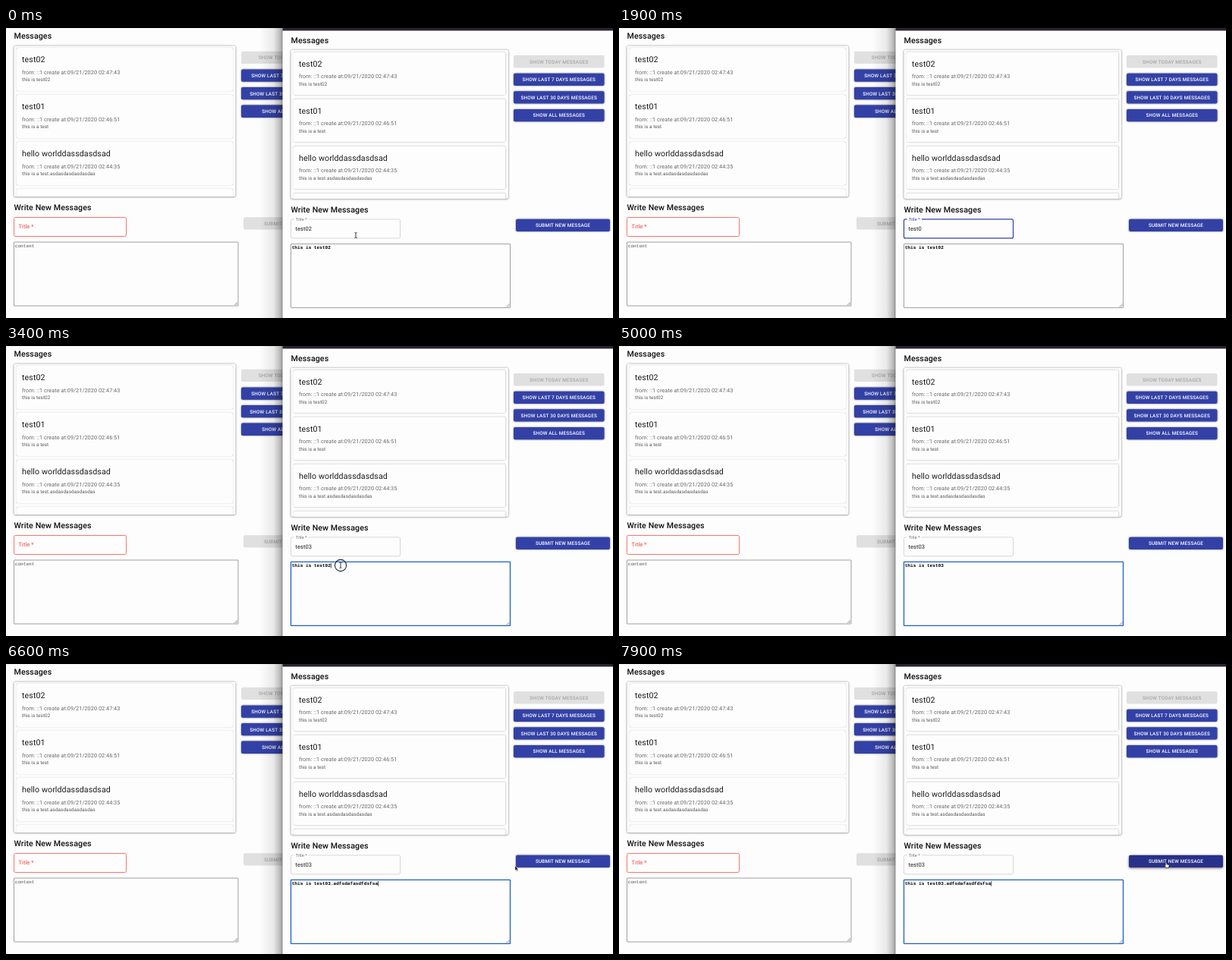
Animation, 800 px wide and 382 px high, one loop 8000 ms. Source, as an HTML page:

```html
<!DOCTYPE html>
<html lang="en">
<head>
<meta charset="utf-8">
<title>Messages</title>
<style>
  html, body { margin: 0; width: 100%; height: 100%; overflow: hidden; background: #fdfdfd; }
  svg { display: block; }
  text { font-family: Roboto, sans-serif; text-rendering: geometricPrecision; white-space: pre; }
  .head { font-size: 10.66px; font-weight: 500; letter-spacing: .0075em; fill: #111; }
  .title { font-size: 10.66px; letter-spacing: .0075em; fill: #1c1c1c; }
  .meta { font-size: 7.25px; letter-spacing: .0094em; fill: #686868; }
  .body { font-size: 6.4px; letter-spacing: .0094em; fill: #585858; }
  .btn { font-size: 6.38px; font-weight: 500; letter-spacing: .02857em; text-anchor: middle; fill: #fff; }
  .off { fill: #a6a6a6; }
  .input { font-size: 7.5px; letter-spacing: .0094em; fill: #1c1c1c; }
  .label { font-size: 5.6px; letter-spacing: .0094em; fill: #707070; }
  .mono { font: bold 6.1px "Liberation Mono", monospace; }
  .list { fill: #fdfdfd; filter: drop-shadow(0 .6px .8px #0006) drop-shadow(0 1px 1.2px #0003); }
  .card { fill: #fdfdfd; filter: drop-shadow(0 .5px .5px #0006) drop-shadow(0 .3px .8px #0002); }
  .raised { fill: #3341a6; filter: drop-shadow(0 .8px .8px #0006) drop-shadow(0 .8px 1.3px #0002); }
  .raised.hover { fill: #283189; filter: drop-shadow(0 1.2px 1.3px #0006) drop-shadow(0 1.5px 2px #0003); }
  .flat { fill: #e0e0e0; }
  .box { fill: none; stroke: #777; stroke-width: .7; }
  .outline { fill: none; stroke: #c4c4c4; stroke-width: .7; }
  .outline.error { stroke: #f0554a; stroke-width: .8; }
  .outline.focus { stroke: #3341a6; stroke-width: 1.2; }
  .box.focus { stroke: #1f62c4; stroke-width: 1.3; }
  .label.focus { fill: #3341a6; }
</style>
</head>
<body>
<svg id="stage" width="800" height="382" viewBox="0 0 800 382"></svg>
<script>
const stage = document.getElementById('stage');

const text = (x, y, cls, str, id = '') => `<text id="${id}" x="${x}" y="${y}" class="${cls}">${str}</text>`;
const rect = (x, y, w, h, cls, id = '', rx = 2) =>
  `<rect id="${id}" x="${x}" y="${y}" width="${w}" height="${h}" rx="${rx}" class="${cls}"/>`;
const button = (x, y, w, label, enabled, id) =>
  rect(x, y, w, 16.3, enabled ? 'raised' : 'flat', id) +
  text(x + w / 2, y + 10.5, enabled ? 'btn' : 'btn off', label);

const messages = [
  ['test02', '02:47:43', 'this is test02'],
  ['test01', '02:46:51', 'this is a test'],
  ['hello worlddassdasdsad', '02:44:35', 'this is a test.asdasdasdasdasdas'],
];
const filters = ['SHOW TODAY MESSAGES', 'SHOW LAST 7 DAYS MESSAGES', 'SHOW LAST 30 DAYS MESSAGES', 'SHOW ALL MESSAGES'];

function card(i, w) {
  const y = 62 * i, m = messages[i];
  return rect(3.5, y + 2.5, w - 7, 57, 'card') + (m
    ? text(10.5, y + 21.8, 'title', m[0]) +
      text(10.5, y + 37, 'meta', `from: ::1 create at:09/21/2020 ${m[1]}`) +
      text(10.5, y + 46.8, 'body', m[2])
    : '');
}

function panel({ x, y, listW, listH, filterX, filterW, formY, areaW, submitX, submitW, canSubmit, id }) {
  const areaY = formY + 41.7, right = x + areaW, bottom = areaY + 84;
  return text(x, y + 14.3, 'head', 'Messages') +
    rect(x, y + 23.5, listW, listH, 'list') +
    `<svg x="${x}" y="${y + 23.5}" width="${listW}" height="${listH}">${[0, 1, 2, 3].map(i => card(i, listW)).join('')}</svg>` +
    filters.map((f, i) => button(filterX, y + 30.8 + 23.6 * i, filterW, f, i > 0)).join('') +
    text(x, formY, 'head', 'Write New Messages') +
    rect(x, areaY, areaW, 84, 'box', id + 'Area', .5) +
    `<path d="M${right - 5} ${bottom - 1}l4-4m-2 4l2-2" class="box"/>` +
    button(submitX, formY + 9, submitW, 'SUBMIT NEW MESSAGE', canSubmit, id + 'Submit');
}

stage.innerHTML = `
  <defs><linearGradient id="shade">
    <stop offset="0" stop-opacity="0"/><stop offset=".6" stop-opacity=".08"/>
    <stop offset=".9" stop-opacity=".28"/><stop offset="1" stop-opacity=".5"/>
  </linearGradient></defs>
  <path d="M0 .3H365" stroke="#ddd" stroke-width=".6"/>` +
  panel({ x: 10.5, y: 0, listW: 292, listH: 198.5, filterX: 310, filterW: 123, formY: 240.3,
    areaW: 295.5, submitX: 313, submitW: 126, canSubmit: false, id: 'back' }) +
  rect(10.5, 249.5, 148, 25, 'outline error') +
  '<g style="--c:#f0554a">' + text(16.5, 264.3, 'input" style="fill:#f0443a', 'Title *') + '</g>' +
  text(11.8, 288.8, 'mono" fill="#808080', 'content') +
  `<rect x="334" width="31" height="382" fill="url(#shade)"/>
  <rect x="364.5" width="436" height="382" fill="#fdfdfd"/>
  <rect x="364.5" width="436" height="3.5" fill="#2b2130"/>` +
  panel({ x: 375.5, y: 5.3, listW: 286.5, listH: 196, filterX: 669, filterW: 119.5, formY: 242.7,
    areaW: 289, submitX: 672, submitW: 124, canSubmit: true, id: 'front' }) +
  rect(375.5, 251.9, 144, 25, 'outline', 'field') +
  '<rect x="379.5" y="250.5" width="19.5" height="3" fill="#fdfdfd"/>' +
  text(381.7, 253.5, 'label', 'Title *', 'label') +
  text(381.5, 267.1, 'input', '', 'titleText') +
  text(376.7, 291.2, 'mono', '', 'areaText') +
  `<rect id="caret" width=".7" fill="#000"/>
  <g id="pointer">
    <circle id="ring" r="7.6" fill="none" stroke="#222a3c" stroke-width="1.1"/>
    <path id="beam" d="M-1.5-3.5Q0-3.5 0-2.5V2.5Q0 3.5-1.5 3.5M1.5-3.5Q0-3.5 0-2.5M0 2.5Q0 3.5 1.5 3.5" fill="none" stroke="#111" stroke-width=".8"/>
    <path id="arrow" d="M0 0V6L1.4 4.8 2.4 7 3.4 6.5 2.4 4.4H4.2Z" stroke="#fff" stroke-width=".4"/>
    <path id="hand" d="M0 0Q.8 0 .8 .8V2.8L3.4 3.4Q4.2 3.7 4 4.6L3.4 7.6H0L-2 4.6Q-1.8 3.7-.8 4.6V.8Q-.8 0 0 0Z" fill="#fff" stroke="#111" stroke-width=".6"/>
  </g>`;

const el = id => document.getElementById(id);
const show = (id, on) => el(id).setAttribute('visibility', on ? 'inherit' : 'hidden');

// time, x, y
const path = [
  [300, 461, 273], [700, 437, 262], [2100, 437, 262], [2800, 439, 284], [2900, 441, 289],
  [6300, 441, 289], [6600, 671, 266], [7200, 721, 261],
];
const caretResets = [700, 1300, 2000, 2900, 4100, 4400, 5600, 5800, 5900, 6000, 6100, 6200, 6300, 6400];
const extra = '.adfsdafasdfdsfsa';

function pointerAt(t) {
  const i = path.findIndex(p => p[0] > t);
  if (i === 0) return path[0].slice(1);
  if (i < 0) return path[path.length - 1].slice(1);
  const [t0, x0, y0] = path[i - 1], [t1, x1, y1] = path[i];
  const k = (t - t0) / (t1 - t0), e = k * k * (3 - 2 * k);
  return [x0 + (x1 - x0) * e, y0 + (y1 - y0) * e];
}

function contentAt(t) {
  if (t < 4100) return 'this is test02';
  if (t < 4400) return 'this is test0';
  const typed = t < 5600 ? 0 : t < 5800 ? 1 : 1 + Math.floor((t - 5700) * 16 / 700);
  return 'this is test03' + extra.slice(0, typed);
}

function render(t) {
  const inTitle = t >= 700 && t < 2900, inArea = t >= 2900, hover = t >= 6700;
  el('field').classList.toggle('focus', inTitle);
  el('label').classList.toggle('focus', inTitle);
  el('frontArea').classList.toggle('focus', inArea);
  el('frontSubmit').classList.toggle('hover', hover);
  el('titleText').textContent = t < 1300 ? 'test02' : t < 2000 ? 'test0' : 'test03';
  el('areaText').textContent = contentAt(t);

  const active = el(inArea ? 'areaText' : 'titleText'), caret = el('caret');
  const last = caretResets.filter(r => r <= t).pop();
  caret.setAttribute('x', +active.getAttribute('x') + active.getComputedTextLength());
  caret.setAttribute('y', inArea ? 286 : 260);
  caret.setAttribute('height', inArea ? 6.5 : 9);
  show('caret', t >= 700 && Math.trunc((t - last - 1) / 500) % 2 === 0);

  const [x, y] = pointerAt(t);
  el('pointer').setAttribute('transform', `translate(${x} ${y})`);
  show('pointer', t < 1300 || (t >= 2100 && t < 4100) || t >= 6300);
  show('ring', (t >= 700 && t < 1200) || (t >= 2900 && t < 3600));
  show('beam', x < 665);
  show('arrow', x >= 665 && !hover);
  show('hand', hover);
}

function tick() {
  render(Math.floor(performance.now() % 8000 / 100) * 100);
  requestAnimationFrame(tick);
}
tick();
</script>
</body>
</html>
```
